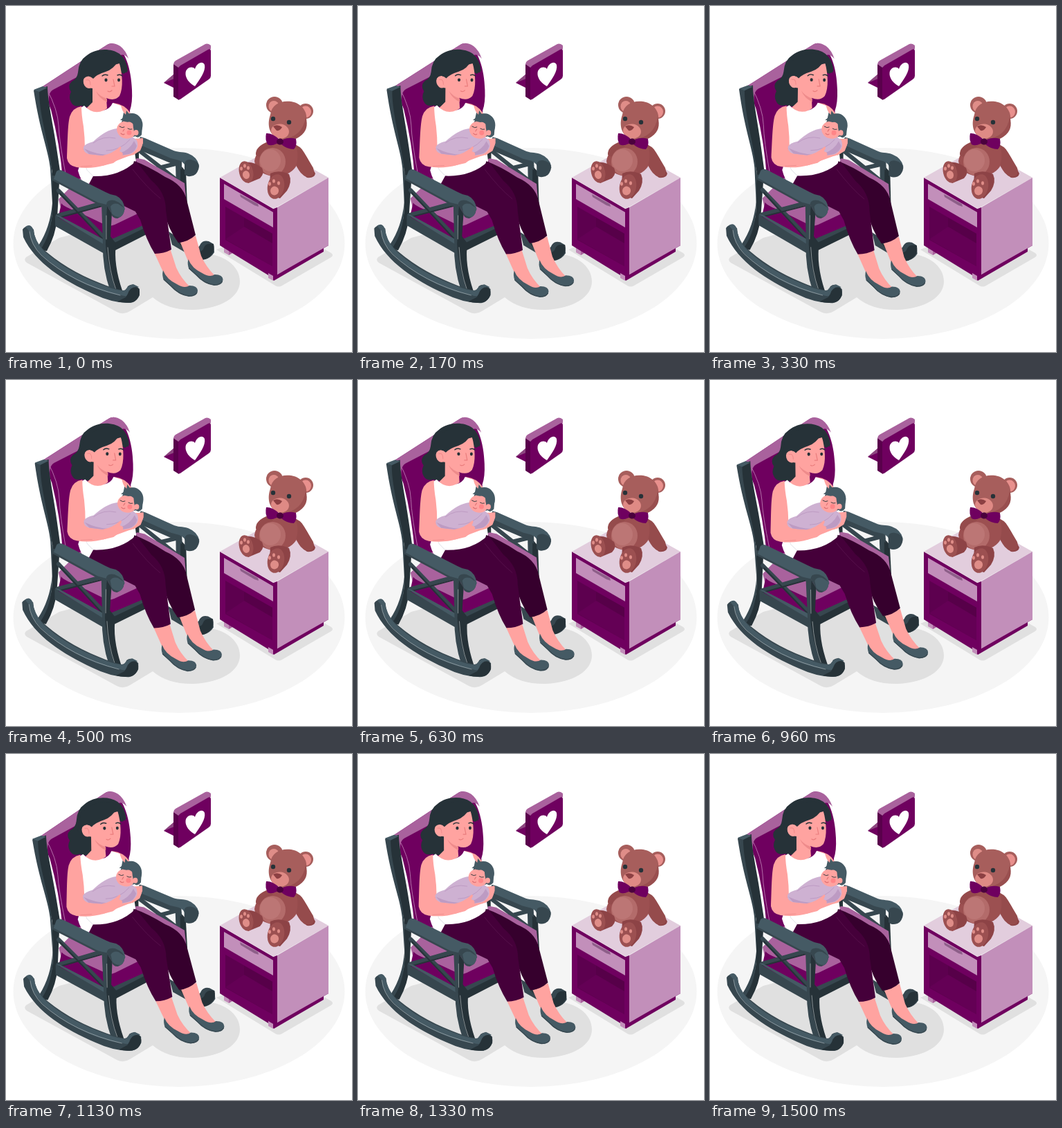
An HTML page with a canvas for the animation above (1.54 s loop, 500 by 500 pixels).

```html
<!DOCTYPE html>
<html lang="en">
<head>
<meta charset="utf-8">
<title>Rocking chair</title>
<style>
html, body { margin: 0; width: 100%; height: 100%; overflow: hidden; background: #fff; }
canvas { display: block; width: 100vw; height: 100vh; }
</style>
</head>
<body>
<canvas id="stage"></canvas>
<script>
const canvas = document.getElementById('stage');
const ctx = canvas.getContext('2d');
const SIZE = 500, LOOP = 1540;
const ratio = window.devicePixelRatio || 1;
canvas.width = canvas.height = SIZE * ratio;

const C = {
  ink: '#263238', slate: '#37474f', steel: '#455a64',
  plum: '#6f005f', deep: '#570049', mauve: '#a9629d', lilac: '#c28fba', pale: '#e2cddd',
  skin: '#ffa3a0', trousers: '#45003a', farTrousers: '#36002d',
  fur: '#9c5051', furHead: '#a75e5c', furDark: '#8d4346', furLight: '#b36b6a', pad: '#df8d88'
};

function fill(color, path) {
  ctx.fillStyle = color;
  ctx.fill(new Path2D(path));
}
function line(color, width, path) {
  ctx.strokeStyle = color;
  ctx.lineWidth = width;
  ctx.stroke(new Path2D(path));
}
function oval(color, x, y, rx, ry = rx, turn = 0) {
  ctx.fillStyle = color;
  ctx.beginPath();
  ctx.ellipse(x, y, rx, ry, turn, 0, Math.PI * 2);
  ctx.fill();
}

function drawFloor() {
  fill('#fff', 'M0 0H500V500H0Z');
  oval('#f5f5f5', 250, 343, 239.5, 138);
  fill('#e0e0e0', 'M29 363Q25 367 30 371L160 442Q170 447 179 441L212 421Q234 440 272 439C312 437 338 420 338 398C338 376 316 360 289 358L190 305L77 335Z');
  fill('#e0e0e0', 'M304 352L389 404Q394 407 399 404L470 363Q474 360 470 357L395 315Z');
}

function drawBubble() {
  fill(C.plum, 'M228 111L246 96L249 120L242 118Z');
  fill('#8d4780', 'M228 111L243 98L243 105Z');
  fill('#5a004c', 'M242 84L250 88V136L242 131Z');
  fill(C.mauve, 'M242 84Q242 81 245 79L288 55Q290 54 293 55L296 57V62L249 89Z');
  fill(C.plum, 'M249 91Q249 88 252 86L292 63Q296 61 296 65V101Q296 104 293 106L253 134Q249 137 249 133Z');
  fill('#fff', 'M273 116C265 112 259 104 259.500 97C260 89 269 86 273 91C275 83 284 78 287 85C289 94 280 106 273 116Z');
}

function drawFarFrame() {
  fill(C.slate, 'M235 326L270 348Q278 352 281 344Q285 338 293 340L300 344L301 356Q296 364 288 366L276 366L240 345Z');
  fill(C.ink, 'M247 340L273 354Q284 357 286 349Q289 342 300 344Q302 353 298 358Q292 366 284 367L268 363Z');
  line(C.ink, 8, 'M188 199V238M188 237L250 276');
  line(C.slate, 6, 'M190 207L250 254M213 236L249 227');
  fill(C.slate, 'M245 226L254 229V268L246 266Z');
  fill(C.ink, 'M252 230L260 239L262 290L252 283Z');
}

function drawFarArm() {
  fill(C.slate, 'M193 194L245 218L254 224V236L240 228L190 207Z');
  fill(C.steel, 'M194 189L201 191L240 208C248 212 254 210 263 213Q276 218 279 230L275 242Q272 245 268 244L260 236Q259 226 250 223L238 220L190 199Z');
  fill(C.slate, 'M258 229Q258 221 267 222Q278 224 279 232Q278 241 271 245Q262 248 258 243Z');
}

function drawBack() {
  fill(C.plum, 'M52 117L110 79L148 55L153 54C172 60 181 91 182 121Q183 140 179 151L182 220L100 272L82 250Q78 200 65 150Z');
  line('#c48abb', .8, 'M59 120Q75 150 76 173T86 242');
  fill(C.mauve, 'M52 117L110 79L146 56Q154 51 165 58Q173 64 177 76Q171 69 165 71L104 102L68 121Q59 126 63 146Q57 128 52 117Z');
  fill(C.ink, 'M47 120L60 116C60 137 69 176 73 205L78 238L74 306Q72 331 59 354L48 353Q67 321 67 294L67 240Q58 196 48 160Z');
  fill(C.slate, 'M40 122Q43 119 48 123C48 160 64 205 67 242L67 301Q64 333 49 353L47 346Q64 320 67 285L64 235C61 207 49 182 40 122Z');
  fill(C.steel, 'M40 121L53 116L60 118L48 124Z');
}

function drawSeat() {
  fill(C.mauve, 'M76 279L105 250L190 220L200 222L258 256L260 276L189 309L147 328L80 296Z');
  fill(C.plum, 'M80 285Q83 290 103 297L145 317Q150 319 157 316L205 293V326L154 349L75 308Z');
  fill(C.ink, 'M149 341L207 316V328L154 355Z');
  fill(C.slate, 'M150 338L207 313L208 317L153 344Z');
}

function drawHairAndFace() {
  fill(C.ink, 'M116 72C129 61 151 60 164 69Q175 78 176 94L170 98L157 91L130 120L130 143Q119 148 108 144Q98 147 94 139Q90 132 94 124Q88 116 95 109Q103 105 104 96Q105 79 116 72Z');
  fill(C.skin, 'M117 104Q137 99 149 87L164 83C168 98 170 118 164 130Q157 138 145 133L146 148L131 158L116 148L125 139V119L117 118Z');
  fill('#ee8b8b', 'M130 123Q136 131 146 134V139Q134 133 130 123Z');
  oval(C.skin, 119, 110, 7.2, 9, -.25);
  line('#ee8b8b', 1, 'M116 107Q122 105 122 114');
  fill(C.ink, 'M111 84Q134 64 156 70Q170 75 175 97Q168 93 162 79Q156 91 144 95Q131 99 126 105Q119 98 112 105L105 112Z');
  oval(C.ink, 144.500, 107, 2.1, 2.4);
  oval(C.ink, 163, 107, 2, 2.4);
  line(C.ink, 1.4, 'M139 101Q142 98 147 100M161 100Q165 98 168 101');
  line('#e97d7d', 1.2, 'M155 106L157 116L153 116M147 123Q150 125 153 122');
}

function drawTorso() {
  fill(C.skin, 'M155 140Q172 142 180 155L185 182L169 188L155 165Z');
  fill('#fff', 'M108 147L113 144Q126 158 141 151Q151 148 154 140L166 144Q169 157 180 165L188 226Q174 240 156 244Q138 247 126 246L117 262Q108 253 104 238L110 218L111 186Z');
  line('#e7e7eb', 1, 'M111 218L117 237L126 246');
  fill(C.skin, 'M109 145Q96 147 92 160C89 172 89 196 88 220Q90 231 102 233Q123 236 143 230L177 217Q193 214 198 198V191L183 192L170 204L148 216L114 206Q114 190 112 174Q109 157 109 145Z');
  line('#ee8b8b', .8, 'M112 207L117 211M108 232L124 231');
}

function drawBaby() {
  fill('#ceb1d2', 'M112 204Q114 199 126 196Q144 179 160 177Q174 181 189 194Q194 207 180 214Q157 219 119 214Q111 211 112 204Z');
  fill('#bd9bc3', 'M113 206Q139 219 164 213Q179 208 185 195L189 202Q186 212 177 214Q155 219 120 214Z');
  line('#b995bf', .8, 'M126 198Q140 187 158 191M145 209Q165 209 179 193');
  oval(C.steel, 182, 172, 15.500, 17);
  fill(C.steel, 'M168 164L170 154L173 157L174 151L178 156Z');
  oval(C.skin, 174, 179, 14, 12.500, .3);
  fill(C.steel, 'M165 165Q172 158 181 157Q194 158 197 173L196 186Q190 193 186 187L184 176L183 166Q174 170 168 165Z');
  oval(C.skin, 188, 183, 3.5, 4);
  oval('#ff8588', 178, 183, 3.5);
  line(C.ink, .9, 'M164 174Q168 177 171 175M176 177Q179 179 182 178');
  line('#dd6f72', 1.1, 'M166 184Q169 187 171 185M171 178L169 181');
  fill(C.skin, 'M140 216Q153 214 165 203Q168 204 164 210Q172 212 167 218L155 227L139 231Z');
  fill(C.skin, 'M186 210Q194 202 196 190Q200 196 194 209L183 216Z');
}

function drawLegs() {
  fill(C.skin, 'M252 342L274 332L282 361Q289 377 302 390Q295 395 281 388Q267 379 262 366Z');
  fill(C.skin, 'M214 356L237 350L246 378Q253 394 267 407Q258 411 246 404Q230 393 226 382Z');
  fill(C.farTrousers, 'M185 224Q205 231 230 247Q256 258 261 280L274 331Q263 341 249 342Q234 322 229 298L177 257Z');
  fill(C.trousers, 'M126 246Q164 247 188 224L210 252Q231 269 231 295L239 352Q228 358 215 358Q203 339 194 309L187 297L117 263Z');
  line('#5b144f', .8, 'M183 236Q204 263 223 278');
  shoe(0, 0);
  shoe(36.500, -16);
}

function shoe(x, y) {
  ctx.save();
  ctx.translate(x, y);
  fill(C.steel, 'M227 382Q232 395 247 402Q258 409 265 404Q277 404 277 412Q276 420 264 420Q248 417 238 405L228 396Q225 389 227 382Z');
  line(C.slate, 1.2, 'M228 395L239 405Q251 418 265 419Q273 419 276 414');
  ctx.restore();
}

function drawNearFrame() {
  line(C.slate, 6, 'M76 267L141 334M75 303L139 285');
  line(C.ink, 2, 'M78 271L140 337M76 306L139 289');
  fill(C.slate, 'M71 303L144 344V359L71 318Z');
  fill(C.steel, 'M71 302L77 303L148 341L144 346Z');
  fill(C.slate, 'M138 284L148 290Q145 322 147 344Q148 374 161 411L151 413Q139 379 140 343Z');
  fill(C.ink, 'M146 289L153 300L151 333L159 343Q155 373 168 411L160 415Q146 375 144 344Z');
  line('#c5cbce', .6, 'M145 303V337M147 349Q149 383 159 410');
  fill(C.slate, 'M67 245L82 246L146 278V293L137 289L67 252Z');
  fill(C.steel, 'M73 239Q77 235 84 239L144 269Q151 273 159 274Q170 279 172 294L165 301Q157 289 145 287L133 284L69 250Z');
  fill(C.slate, 'M145 287Q146 279 157 281Q170 286 171 295Q170 304 161 307Q153 307 152 299Z');
  fill(C.steel, 'M151 290Q154 284 162 286L171 292Q171 302 165 305Q157 305 153 300Z');
  fill(C.slate, 'M24 323Q27 318 34 318L40 323Q41 338 50 348Q86 381 135 400Q154 408 169 411Q174 411 176 405Q182 400 189 405L193 409V418Q189 427 180 429Q155 430 126 416C84 397 43 372 25 334Z');
  fill(C.steel, 'M28 319Q35 314 39 322Q42 340 54 353Q87 385 147 406Q162 412 172 411Q176 404 184 402L192 406Q182 407 180 416Q177 421 166 418C124 412 74 384 47 355Q35 342 34 326Z');
  fill(C.ink, 'M176 416Q179 406 188 406Q194 408 193 417Q190 426 183 428Q171 430 161 427L173 421Z');
  line('#b8c0c4', .6, 'M34 326Q36 345 51 360Q96 401 165 418');
}

function drawCabinet() {
  fill(C.lilac, 'M315 344L328 351V356L322 360L315 356Z');
  fill(C.mauve, 'M322 352L329 353V356L322 360Z');
  fill(C.plum, 'M309 248L386 293L392 291V388L466 344V346L459 350V355L387 397L379 389L309 346Z');
  fill(C.lilac, 'M379 386L386 390V397L379 393Z');
  fill(C.pale, 'M309 248L382 207Q386 204 391 206L466 248L387 293Z');
  fill(C.lilac, 'M392 291L466 248V346L392 388Z');
  fill(C.lilac, 'M315 257L386 298V320L315 279Z');
  fill('#8d5f89', 'M338 272L364 286L365 290L359 288L339 276Z');
  fill('#5d004f', 'M317 290L385 329V376L317 338Z');
  fill(C.deep, 'M344 306L385 329V343L344 319Z');
  fill('#640055', 'M317 337L344 319L385 343V376Z');
}

function drawBear() {
  fill(C.furDark, 'M416 200Q430 207 439 227L447 242Q446 249 435 248Q426 243 420 228Z');
  fill('#954b4c', 'M414 199Q426 202 431 212L444 234Q447 245 438 247Q429 247 423 237L411 217Z');
  fill(C.fur, 'M380 197Q396 188 416 197Q425 210 419 232Q409 247 384 246Q361 241 359 224Q361 209 380 197Z');
  fill('#954b4c', 'M379 196Q360 203 361 215Q366 221 373 212L386 203Z');
  oval(C.furLight, 385, 225, 19, 20);
  oval('#bc7675', 382, 223, 15, 16);
  fill(C.furDark, 'M345 226Q358 224 370 234Q374 242 367 249L350 256Z');
  oval(C.fur, 347, 240, 10, 16, -.25);
  fill(C.furDark, 'M382 242Q394 236 409 243Q414 254 406 267L396 278L380 273Z');
  oval(C.fur, 390, 261, 12, 18, .2);
  oval(C.pad, 347, 244, 5, 6, -.25);
  oval(C.pad, 388, 267, 6, 6.500, .2);
  for (const [x, y] of [[340, 235], [345, 231], [350, 234], [381, 257], [387, 253], [394, 256]])
    oval(C.pad, x, y, 2, 2.8);
  oval(C.furHead, 388, 143, 12);
  oval(C.pad, 387, 145, 7.500, 8);
  oval(C.furHead, 433, 152, 11);
  oval('#e8908d', 433, 153, 8, 8.500);
  fill(C.furHead, 'M382 157C384 142 397 136 412 138C429 141 438 155 433 171C429 190 410 197 393 191C380 186 377 171 382 157Z');
  fill('#994f4f', 'M433 160Q439 179 424 189Q413 197 397 193Q429 190 433 160Z');
  oval('#df8a85', 396, 181, 13, 10.500, .15);
  fill('#8c4043', 'M386 174Q392 170 399 175Q396 181 391 180Z');
  oval(C.ink, 386, 163, 3.2);
  oval(C.ink, 409, 168, 3.2);
  fill(C.plum, 'M376 184Q384 183 394 192L400 193Q409 189 419 192Q421 202 416 207Q406 207 398 200L391 199Q383 203 378 200Q374 193 376 184Z');
  oval('#4b003d', 396, 196, 5, 4.500, .2);
}

const ease = p => (1 - Math.cos(Math.PI * p)) / 2;

// Swing from rest to +1, across to -1 and back to rest.
function sway(t) {
  if (t < 350) return Math.sin(Math.PI * t / 700);
  if (t < 1110) return 1 - 2 * ease((t - 350) / 760);
  return ease((t - 1110) / (LOOP - 1110)) - 1;
}

function drawRocking(t) {
  ctx.save();
  ctx.translate(165, 258);
  ctx.rotate(.0145 * sway(t));
  ctx.translate(-165, -258);
  drawFarFrame();
  drawBack();
  drawSeat();
  drawFarArm();
  drawHairAndFace();
  drawTorso();
  drawBaby();
  drawLegs();
  drawNearFrame();
  ctx.restore();
}

function render(now) {
  ctx.setTransform(ratio, 0, 0, ratio, 0, 0);
  ctx.lineCap = 'round';
  ctx.lineJoin = 'round';
  drawFloor();
  drawBubble();
  drawRocking(now % LOOP);
  drawCabinet();
  drawBear();
  requestAnimationFrame(render);
}
render(performance.now());
</script>
</body>
</html>
```
